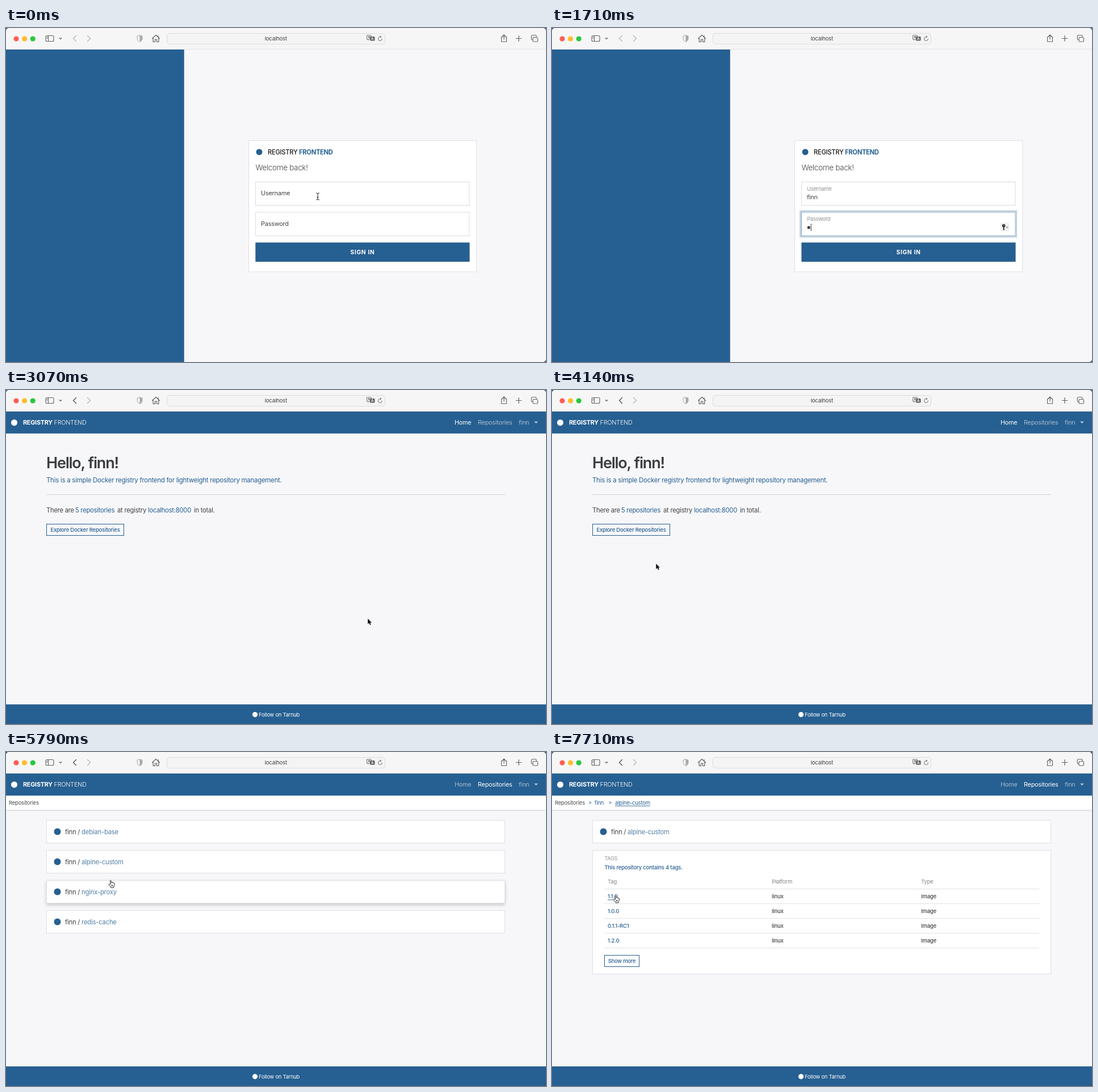
Recreate the animation shown at these times as an HTML page with a canvas. Size 951 by 589 pixels, loop 8 s.

```html
<!DOCTYPE html>
<html lang="en">
<head>
<meta charset="utf-8">
<title>Registry Frontend</title>
<style>
  html, body { margin: 0; width: 100%; height: 100%; overflow: hidden; background: #f7f7f9; }
  canvas { display: block; width: 951px; height: 589px; }
</style>
</head>
<body>
<canvas id="stage"></canvas>
<script>
const W = 951, H = 589, LOOP = 8000;
const BLUE = '#265f91', DARK = '#3f4245', BODY = '#f7f7f9', LINE = '#dcdfe3';
const USER = 'finn', REPO = 'alpine-custom';
const canvas = document.getElementById('stage');
const ctx = canvas.getContext('2d');
const dpr = window.devicePixelRatio || 1;
canvas.width = W * dpr;
canvas.height = H * dpr;

const clamp = v => Math.max(0, Math.min(1, v));
const ramp = (t, a, b) => clamp((t - a) / (b - a));
const smooth = p => p * p * (3 - 2 * p);
const between = (t, a, b) => t >= a && t < b;
const mix = (a, b, p) => a + (b - a) * p;
const mixRgb = (a, b, p) => `rgb(${a.map((v, i) => Math.round(mix(v, b[i], p)))})`;

function rect(x, y, w, h, fill) {
  ctx.fillStyle = fill;
  ctx.fillRect(x, y, w, h);
}

function box(x, y, w, h, border, fill) {
  if (fill) rect(x, y, w, h, fill);
  ctx.strokeStyle = border;
  ctx.lineWidth = 1;
  ctx.strokeRect(x + .5, y + .5, w - 1, h - 1);
}

function disc(x, y, r, fill) {
  ctx.fillStyle = fill;
  ctx.beginPath();
  ctx.arc(x, y, r, 0, 7);
  ctx.fill();
}

function icon(d, x, y, color, width = 1.1) {
  ctx.save();
  ctx.translate(x, y);
  ctx.strokeStyle = color;
  ctx.lineWidth = width;
  ctx.lineCap = ctx.lineJoin = 'round';
  ctx.stroke(new Path2D(d));
  ctx.restore();
}

// Draws text with y at the middle of the capitals; returns its width.
function text(str, x, y, size, color, { weight = 400, align = 'left', track = -.02, under = false } = {}) {
  ctx.font = `${weight} ${size}px Inter, sans-serif`;
  ctx.letterSpacing = `${size * track}px`;
  ctx.textAlign = align;
  ctx.textBaseline = 'middle';
  ctx.fillStyle = color;
  ctx.fillText(str, x, y);
  const width = ctx.measureText(str).width;
  if (under) rect(x, y + size * .5, width, .9, color);
  return width;
}

function toolbar(canGoBack) {
  const ink = '#626262', pale = '#b5b5b5';
  rect(0, 0, W, 37.7, '#f7f6f6');
  rect(0, 36.9, W, .8, '#dfdede');
  ['#fe5f57', '#febc2e', '#28c840'].forEach((c, i) => disc(18 + i * 14.6, 19, 4.6, c));
  icon('M-5-5H5Q7-5 7-3V3Q7 5 5 5H-5Q-7 5-7 3V-3Q-7-5-5-5M-2.5-5V5M-5.2-2.5H-4M-5.2-.5H-4', 77, 18.5, ink);
  icon('M-2-1L0 1L2-1', 96, 18.5, ink);
  icon('M2.5-5L-2.5 0L2.5 5', 121, 18.5, canGoBack ? '#4c4c4c' : pale, 1.3);
  icon('M-2.5-5L2.5 0L-2.5 5', 146, 18.5, pale, 1.3);
  icon('M0-5.6Q-2-4.8-4.4-4.4V0Q-4.4 4 0 5.8Q4.4 4 4.4 0V-4.4Q2-4.8 0-5.6Z', 235.5, 18.5, '#9a9a9a', .9);
  ctx.save();
  ctx.translate(235.5, 18.5);
  ctx.fillStyle = '#a8a8a8';
  ctx.fill(new Path2D('M0-5.6Q2-4.8 4.4-4.4V0Q4.4 4 0 5.8Z'));
  ctx.restore();
  icon('M-6.5 0L0-6L6.5 0M-4.8-1V6H-1.5V1.5H1.5V6H4.8V-1M4-5V-3', 264, 18.5, ink, 1.2);

  ctx.beginPath();
  ctx.roundRect(283.5, 9.5, 384, 19, 4.5);
  ctx.fillStyle = '#f5f4f4';
  ctx.fill();
  ctx.strokeStyle = '#dedddd';
  ctx.lineWidth = 1;
  ctx.stroke();
  text('localhost', 475.3, 19.2, 9.6, '#414141', { align: 'center' });
  icon('M-6-5H1V2H-3L-4.5 3.5V2H-6ZM-4-2.5H-1M-2.5-3.5V-2.5Q-3-1-4 0M-3-1.5L-1 0', 642, 18, ink, .9);
  ctx.beginPath();
  ctx.roundRect(641, 15, 8.5, 7.5, 1.5);
  ctx.fillStyle = ink;
  ctx.fill();
  text('A', 645.2, 18.8, 6, '#fff', { align: 'center', weight: 600 });
  icon('M3.4 0A3.5 3.5 0 1 1 0-3.5H1.5M0-5.3L1.8-3.5L0-1.8', 659, 19, ink, .9);
  icon('M-2-2.5H-4.5V6H4.5V-2.5H2M0 2V-6M-2.5-3.5L0-6L2.5-3.5', 877, 18, ink);
  icon('M-4.8 0H4.8M0-4.8V4.8', 903, 18.5, ink, 1.2);
  icon('M-2-2H4Q5.5-2 5.5 0V4Q5.5 5.5 4 5.5H-1.5Q-3 5.5-3 4V-.5Q-3-2-1.5-2M-3 2.5H-4Q-5.7 2.5-5.7 1V-4Q-5.7-5.7-4-5.7H1.5Q3-5.7 3-4V-2', 931, 18.5, ink);
}

function field(label, y, value, focus, floating, keyShown) {
  if (focus > 0) {
    const s = 3 * focus;
    rect(439 - s, y - s, 377 + 2 * s, 42 + 2 * s, `rgba(38,95,145,${.28 * clamp(focus * 2)})`);
  }
  box(439, y, 377.5, 42.3, mixRgb([216, 219, 223], [147, 175, 200], focus), '#fff');
  const grey = mixRgb([63, 66, 69], [139, 142, 145], floating);
  text(label, 449, y + mix(21, 12.8, floating), mix(10.9, 9.25, floating), grey);
  value();
  if (keyShown) {
    ctx.beginPath();
    ctx.roundRect(789.5, y + 19, 16, 15, 3);
    ctx.fillStyle = '#efefef';
    ctx.fill();
    disc(795.5, y + 24, 2.8, '#2e2e2e');
    rect(794.6, y + 25, 2, 7, '#2e2e2e');
    disc(795.5, y + 23.2, .7, '#efefef');
    icon('M-1.5-.7L0 .7L1.5-.7', 801.5, y + 27, '#333', 1);
  }
}

function login(t) {
  rect(0, 37.7, 313.7, H, BLUE);
  box(427, 198, 402, 232.5, LINE, '#fff');
  disc(446, 218.7, 5.5, BLUE);
  text('REGISTRY', 461, 219.2, 11.1, '#151515', { weight: 500 });
  text('FRONTEND', 516, 219.2, 11.1, BLUE, { weight: 700 });
  text('Welcome back!', 439.5, 246.5, 13.4, DARK, { weight: 300 });

  const typed = [500, 570, 710, 860].filter(s => t >= s).length;
  const onUser = between(t, 70, 1000), onPass = between(t, 1000, 2930);
  field('Username', 271, () => {
    const width = text(USER.slice(0, typed), 449, 298.5, 10.9, DARK);
    if (onUser && !between(t, 360, 500)) rect(449 + width, 291, 1, 14, '#333');
  }, ramp(t, 50, 200) * (1 - ramp(t, 1000, 1180)), ramp(t, 50, 170), onUser && t >= 140);

  const dots = [1710, 1860, 2000, 2070, 2210, 2290, 2430, 2500].filter(s => t >= s).length;
  field('Password', 324.5, () => {
    for (let i = 0; i < dots; i++) disc(452.2 + i * 6.72, 351.8, 2.6, '#383838');
    if (onPass && !between(t, 1570, 1710)) rect(449 + dots * 6.72, 345, 1, 13, '#333');
  }, ramp(t, 1000, 1180) * (1 - ramp(t, 2930, 3060)), ramp(t, 1000, 1120), onPass);

  rect(439.3, 378.3, 377.2, 34, mixRgb([38, 95, 145], [34, 81, 122], ramp(t, 2860, 2990)));
  text('SIGN IN', 628, 395.9, 10.2, '#fff', { weight: 700, align: 'center', track: .07 });
}

function chrome(active) {
  rect(0, 37.7, W, 39, BLUE);
  disc(14.5, 57.5, 5.5, '#fff');
  text('REGISTRY', 30, 57.9, 10.8, '#fff', { weight: 700 });
  text('FRONTEND', 84.5, 57.9, 10.8, '#fff', { weight: 300 });
  const muted = 'rgba(255,255,255,.58)';
  text('Home', 790, 57.9, 10.8, active === 'home' ? '#fff' : muted);
  text('Repositories', 831, 57.9, 10.8, active === 'repos' ? '#fff' : muted);
  text(USER, 903, 57.9, 10.8, muted);
  ctx.fillStyle = '#b4c8da';
  ctx.fill(new Path2D('M930 55.5H937L933.5 59Z'));
  rect(0, 554.4, W, 35, BLUE);
  disc(438.5, 572.3, 4.6, '#fff');
  text('Follow on Tarnub', 445, 572.9, 9.25, '#fff');
}

function outlineButton(label, x, y, w, size, fill = 0) {
  box(x, y, w, 21, BLUE, fill ? `rgba(38,95,145,${fill})` : null);
  text(label, x + w / 2, y + 10.7, size, mixRgb([38, 95, 145], [255, 255, 255], fill), { weight: 500, align: 'center' });
}

function home(t) {
  chrome('home');
  text(`Hello, ${USER}!`, 71, 129.6, 27, '#3b3e41', { weight: 600, track: -.045 });
  text('This is a simple Docker registry frontend for lightweight repository management.', 71, 159.3, 11.4, BLUE);
  rect(71, 184, 808, 1, '#d2d3d6');
  const line = (s, x, c, under) => text(s, x, 212.4, 11.2, c, { under });
  line('There are', 71, DARK);
  line('5 repositories', 122, BLUE, between(t, 4030, 4090));
  line('at registry', 196, DARK);
  line('localhost:8000', 250, BLUE);
  line('in total.', 331, DARK);
  outlineButton('Explore Docker Repositories', 71, 236, 137, 9.45, ramp(t, 4430, 4570));
}

function loading(t) {
  chrome('repos');
  const turn = (t - 4930) / 750 * Math.PI * 2;
  ctx.beginPath();
  ctx.arc(475, 314, 21.8, turn + .86, turn + 5.62);
  ctx.strokeStyle = BLUE;
  ctx.lineWidth = 2.6;
  ctx.stroke();
}

function breadcrumb() {
  ctx.save();
  ctx.shadowColor = 'rgba(0,0,0,.22)';
  ctx.shadowBlur = 3 * dpr;
  ctx.shadowOffsetY = dpr;
  rect(0, 76.7, W, 25.3, '#fff');
  ctx.restore();
  rect(0, 73, W, 3.7, BLUE);
  text('Repositories', 5, 89.9, 9.45, '#4a4d50');
}

function repoCard(y, name, hover = 0) {
  ctx.save();
  ctx.shadowColor = `rgba(0,0,0,${.2 * hover})`;
  ctx.shadowBlur = 6 * dpr;
  ctx.shadowOffsetY = 3 * dpr;
  rect(71, y, 808, 41, '#fff');
  ctx.restore();
  box(71, y, 808, 41, LINE);
  disc(90.5, y + 20.5, 6, BLUE);
  const width = text(`${USER} / `, 104, y + 21.2, 11.3, DARK);
  text(name, 104 + width, y + 21.2, 11.3, '#5480a7');
}

function repoList(t) {
  chrome('repos');
  breadcrumb();
  const second = ramp(t, 5850, 6000);
  const third = ramp(t, 4990, 5140) * (1 - ramp(t, 5780, 5930));
  ['debian-base', REPO, 'nginx-proxy', 'redis-cache']
    .forEach((name, i) => repoCard(120 + i * 53, name, [0, second, third, 0][i]));
}

function details(t) {
  chrome('repos');
  breadcrumb();
  text('>', 64, 89.9, 9.2, BLUE);
  text(USER, 75, 89.9, 9.5, BLUE);
  text('>', 99.5, 89.9, 9.2, BLUE);
  text(REPO, 111, 89.9, 9.5, BLUE, { under: true });
  repoCard(120, REPO);

  box(71, 173, 808, 219, LINE, '#fff');
  text('TAGS', 92.5, 188.2, 9, '#8e9194');
  text('This repository contains 4 tags.', 92.5, 204.3, 9.5, BLUE, { weight: 500 });
  const row = (cells, y, style) => cells.forEach(([s, c, under], i) =>
    text(s, [98, 387, 650][i], y, 9.5, c, { ...style, under }));
  row(['Tag', 'Platform', 'Type'].map(s => [s, '#808386']), 229.6, {});
  rect(92, 241, 766, 1, '#dfe2e5');
  ['1.1.0', '1.0.0', '0.1.1-RC1', '1.2.0'].forEach((tag, i) => {
    const y = 255.5 + i * 26;
    row([[tag, BLUE, i === 0 && t >= 7630], ['linux', DARK], ['Image', DARK]], y, { weight: 500 });
    rect(92, 267 + i * 26, 766, 1, '#dfe2e5');
  });
  outlineButton('Show more', 92, 358, 62, 9.4);
}

// Pointer path: time, x, y.
const path = [
  [0, 549, 297], [2640, 549, 297], [2990, 637, 403],
  [3660, 637, 403], [3850, 400, 240], [3960, 245, 160], [4060, 172, 208], [4140, 183, 306],
  [4300, 183, 306], [4570, 178.5, 249], [5580, 178.5, 249], [6140, 196, 178],
  [6650, 196, 178], [7500, 131, 258], [7700, 111.5, 253], [8000, 111.5, 253]
];

function pointerAt(t) {
  const i = path.findIndex((p, n) => n && t <= p[0]);
  const [a, b] = [path[i - 1], path[i]];
  let p = ramp(t, a[0], b[0]);
  if (b[0] - a[0] > 250) p = smooth(p);
  return [mix(a[1], b[1], p), mix(a[2], b[2], p)];
}

function pointerKind(t, y) {
  if (t < 3070) {
    if (y > 378) return 'hand';
    return between(y, 313, 325) || y > 366 ? 'arrow' : 'beam';
  }
  return between(t, 4430, 6430) || t >= 7630 ? 'hand' : 'arrow';
}

const BEAM = 'M-2.5-6Q0-6 0-4.5Q0-6 2.5-6M0-4.5V4.5M-2.5 6Q0 6 0 4.5Q0 6 2.5 6M-1.2 1.5H1.2';
const ARROW = new Path2D('M.2 .2V9.9L2.4 7.8L4 11.4L5.7 10.6L4.2 7.2H7.1Z');
const HAND = new Path2D('M-.9 .9Q0-.5 1 .9L1.8 4Q3 1.6 3.6 3.2L3.9 4.6Q5 3.2 5.5 5Q7.2 4.5 7 7Q6.8 9.6 5.8 10.6L5.6 12.8H.6L.3 11.4Q-1.5 9.5-3.1 7.3Q-2.4 5.2 .4 6.8Z');

function pointer(t) {
  if (between(t, 500, 2710)) return;
  const [x, y] = pointerAt(t);
  const kind = pointerKind(t, y);
  if (kind === 'beam') {
    icon(BEAM, x, y, '#fff', 2.2);
    icon(BEAM, x, y, '#222', 1);
    return;
  }
  ctx.save();
  ctx.translate(x, y);
  ctx.lineJoin = 'round';
  if (kind === 'arrow') {
    ctx.strokeStyle = '#fff';
    ctx.lineWidth = 1.6;
    ctx.stroke(ARROW);
    ctx.fillStyle = '#111';
    ctx.fill(ARROW);
  } else {
    ctx.fillStyle = '#fff';
    ctx.fill(HAND);
    ctx.strokeStyle = '#222';
    ctx.lineWidth = 1;
    ctx.stroke(HAND);
    ctx.stroke(new Path2D('M1.9 8V10.5M3.6 8V10.5'));
  }
  ctx.restore();
}

function corners() {
  ctx.beginPath();
  ctx.rect(0, 0, W, H);
  ctx.roundRect(0, 0, W, H, 5);
  ctx.fillStyle = '#3d5568';
  ctx.fill('evenodd');
}

function draw(t) {
  ctx.setTransform(dpr, 0, 0, dpr, 0, 0);
  rect(0, 0, W, H, BODY);
  const page = t < 3070 ? login : t < 4930 ? home : t < 5000 ? loading : t < 6430 ? repoList : details;
  page(t);
  toolbar(t >= 3070);
  pointer(t);
  corners();
}

const start = performance.now();
function tick() {
  draw((performance.now() - start) % LOOP);
  requestAnimationFrame(tick);
}
tick();
</script>
</body>
</html>
```
